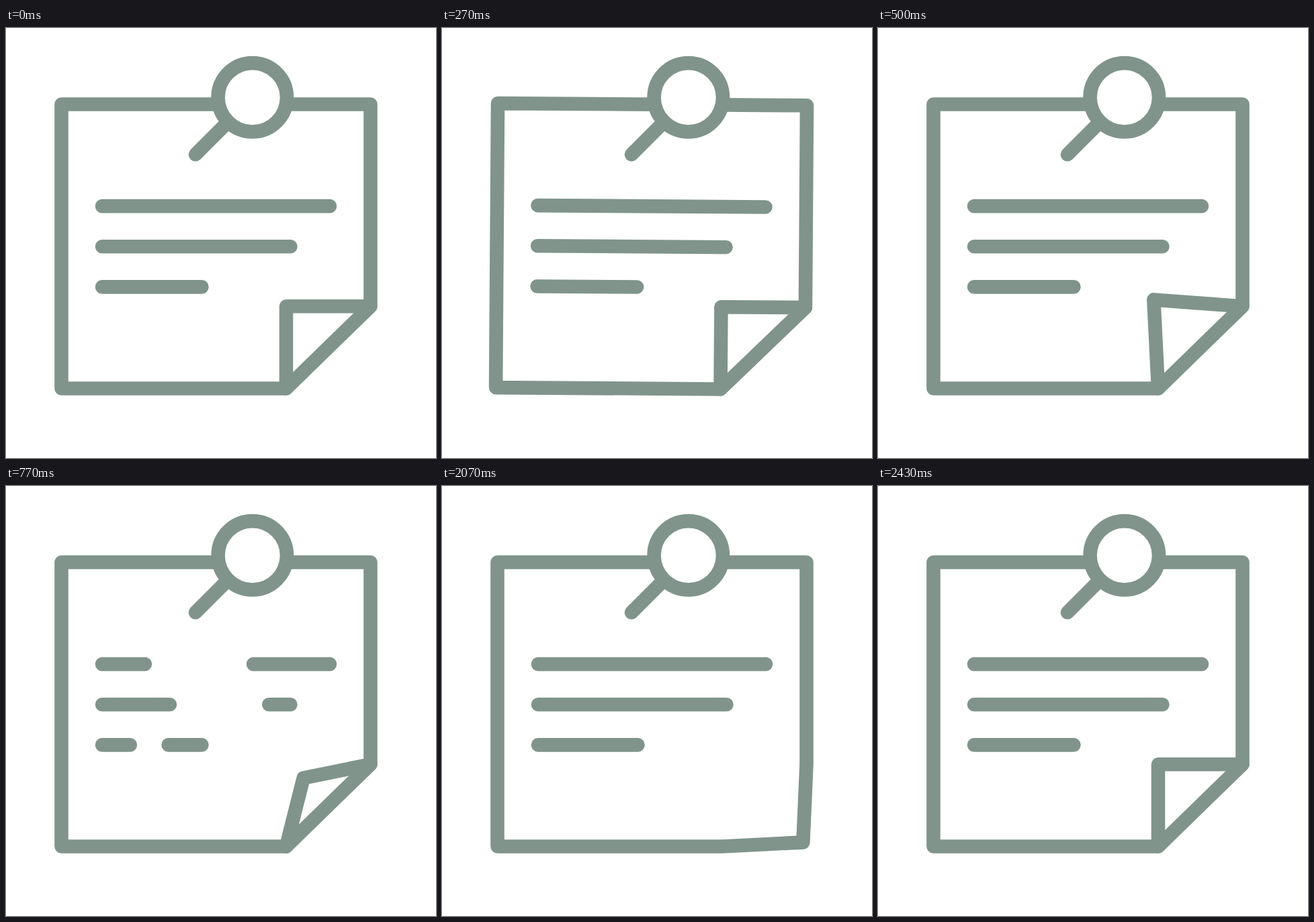
An HTML page for the animation above (2500 ms loop, 640 by 640 pixels).

```html
<!DOCTYPE html>
<html lang="en">
<head>
<meta charset="utf-8">
<title>Pinned note</title>
<style>
  html, body { margin: 0; width: 100%; height: 100%; overflow: hidden; background: #fff; }
  svg { display: block; width: 100vw; height: 100vh; }
  path, circle { fill: none; stroke: #80948b; stroke-width: 20.6; stroke-linecap: round; stroke-linejoin: round; }
  #ring { fill: #fff; }
</style>
</head>
<body>
<svg viewBox="0 0 640 640">
  <g id="note">
    <path id="sheet"/>
    <path id="crease" d="M542.5 414.3L417 536.5"/>
    <path id="text"/>
  </g>
  <path d="M282 188.3L328 142.3"/>
  <circle id="ring" cx="366.8" cy="103.3" r="51.2"/>
</svg>
<script>
const LOOP = 2500, FPS = 30;
const FOLDED = [417, 414.3], LIFTED = [405.4, 397], FLAT = [542.5, 535.3];
const LEFT = 143, TOP = 265.1, GAP = 60.15, WIPE = 9;
const lines = [
  { right: 482, erase: 17.5, write: 20.5 },
  { right: 423.5, erase: 15.9, write: 19.35 },
  { right: 291.5, erase: 17.5, write: 19.85 }
];

const [note, sheet, crease, text] =
  ["note", "sheet", "crease", "text"].map(id => document.getElementById(id));

const ramp = (n, from, to) => Math.min(1, Math.max(0, (n - from) / (to - from)));
const smooth = x => x * x * (3 - 2 * x);
const soft = x => x < 0.5 ? 0.5 * (2 * x) ** 1.4 : 1 - 0.5 * (2 - 2 * x) ** 1.4;
const ease = (n, from, to) => smooth(ramp(n, from, to));
const mix = (a, b, k) => a.map((v, i) => v + (b[i] - v) * k);

// Swings one way, then the other, then back to rest
const swing = n => 4.1 * ease(n, 1, 5) - 7.4 * ease(n, 5, 11) + 3.3 * ease(n, 11, 15);

function corner(n) {
  const lifted = mix(FOLDED, LIFTED, ease(n, 11, 18.3));
  const opened = mix(lifted, FLAT, ease(n, 18.3, 32));
  return mix(opened, FOLDED, soft(ramp(n, 61, 73)));
}

// The old line is wiped from the left while a new one follows it
function linePath({ right, erase, write }, i, n) {
  const y = TOP + GAP * i;
  const reach = start => LEFT + (right - LEFT) * ease(n, start, start + WIPE);
  const tail = reach(erase), head = reach(write);
  return (head > LEFT ? `M${LEFT} ${y}H${head}` : "") +
         (tail < right ? `M${tail} ${y}H${right}` : "");
}

function draw(ms) {
  const n = Math.floor(ms * FPS / 1000 + 0.15);
  const [x, y] = corner(n);
  note.setAttribute("transform", `rotate(${swing(n)} 282 188.3)`);
  sheet.setAttribute("d", `M417 536.5H82.5V113.5H542.5V414.3L${x} ${y}Z`);
  // The crease vanishes once the corner has opened past it
  const folded = x + y < 417 + 536.5;
  crease.setAttribute("visibility", folded ? "visible" : "hidden");
  text.setAttribute("d", lines.map((line, i) => linePath(line, i, n)).join(""));
}

function tick() {
  draw(performance.now() % LOOP);
  requestAnimationFrame(tick);
}
tick();
</script>
</body>
</html>
```
